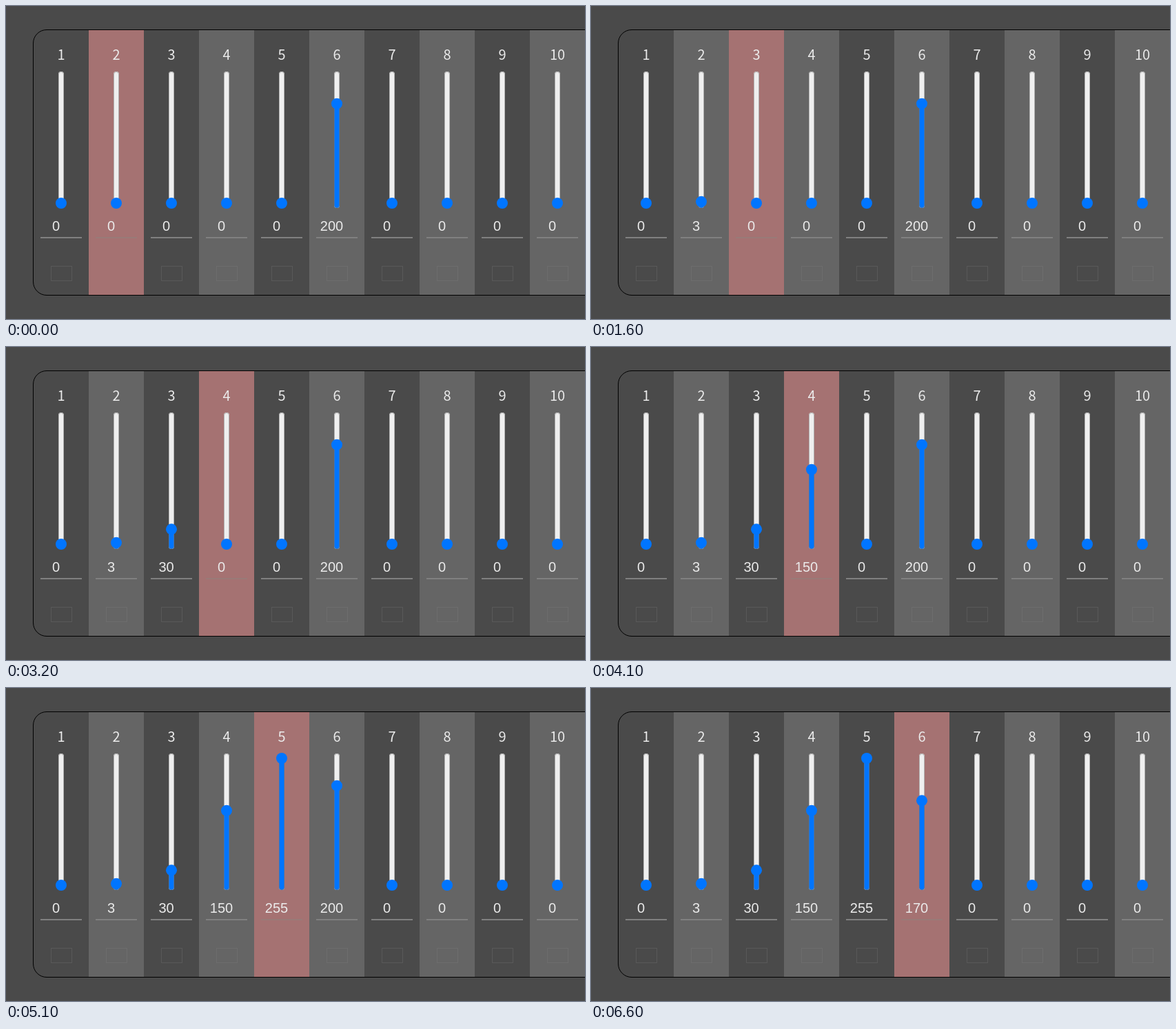
An HTML page that plays this animation: 840x454 px, repeating every 7 s.

```html
<!DOCTYPE html>
<html lang="en">
<head>
<meta charset="utf-8">
<title>Channel faders</title>
<style>
html, body { margin: 0; width: 100%; height: 100%; overflow: hidden; background: #4a4a4a; }
svg { display: block; width: 840px; height: 454px; }
.back { fill: #4a4a4a; }
g:nth-child(even) > .back { fill: #656565; }
.label, .value { fill: #ebebeb; text-anchor: middle; }
.label { font: 20px "Noto Sans CJK JP", "Noto Sans CJK SC", "Noto Sans CJK", "Noto Sans", sans-serif; }
.value { font: 20px "Liberation Sans", Arial, sans-serif; }
.track { fill: #efefef; }
.rim { fill: none; stroke: #767676; stroke-opacity: .5; }
.fill, .knob { fill: #0075ff; }
.line { fill: #808080; }
.box { fill: none; stroke: #808080; stroke-opacity: .27; }
.frame { fill: none; stroke: #000; }
g.selected > .back { fill: #a57272; }
g.selected > .line { fill: #997a78; }
g.selected > .box { stroke: none; }
</style>
</head>
<body>
<svg viewBox="0 0 840 454">
  <clipPath id="card"><rect x="40" y="35" width="830" height="384" rx="19"/></clipPath>
  <g id="columns" clip-path="url(#card)"></g>
  <rect class="frame" x="39.5" y="34.5" width="831" height="385" rx="19.5"/>
</svg>
<script>
const LOOP = 7000;
const KEY_GAP = 200;
const TOP = 102, BOTTOM = 286, MAX = 255;
const initial = channel => channel === 6 ? 200 : 0;

// Each channel is selected, then its value is typed digit by digit.
const entries = [
  { channel: 2, select: 0, type: 800, text: "3" },
  { channel: 3, select: 1600, type: 2200, text: "30" },
  { channel: 4, select: 2900, type: 3300, text: "150" },
  { channel: 5, select: 4200, type: 4400, text: "255" },
  { channel: 6, select: 5300, type: 5900, text: "170" }
];

function add(parent, tag, attrs) {
  const node = document.createElementNS("http://www.w3.org/2000/svg", tag);
  for (const name in attrs) node.setAttribute(name, attrs[name]);
  return parent.appendChild(node);
}

function makeChannel(_, i) {
  const x = 40 + 80 * i;
  const group = add(document.getElementById("columns"), "g", { transform: `translate(${x} 0)` });
  const rect = (name, x, y, width, height, rx = 0) =>
    add(group, "rect", { class: name, x, y, width, height, rx });

  rect("back", 0, 35, 80, 384);
  add(group, "text", { class: "label", x: 40, y: 78 }).textContent = i + 1;
  rect("track", 36, 95, 8, 198, 4);
  const fill = rect("fill", 36, 95, 8, 198, 4);
  rect("rim", 36.5, 95.5, 7, 197, 3.5);
  const knob = add(group, "circle", { class: "knob", cx: 40, r: 8 });
  const value = add(group, "text", { class: "value", x: 32.5, y: 326 });
  rect("line", 10, 335, 60, 2);
  rect("box", 25.5, 377.5, 30, 21);
  return { number: i + 1, group, fill, knob, value };
}

const channels = Array.from({ length: 10 }, makeChannel);

function valueAt(channel, time) {
  const entry = entries.find(e => e.channel === channel);
  if (!entry || time < entry.type) return initial(channel);
  const digits = 1 + Math.floor((time - entry.type) / KEY_GAP);
  return Number(entry.text.slice(0, digits));
}

function draw(time) {
  const active = entries.filter(e => e.select <= time).pop().channel;
  for (const { number, group, fill, knob, value } of channels) {
    const level = valueAt(number, time);
    const y = BOTTOM + (TOP - BOTTOM) * level / MAX;
    group.classList.toggle("selected", number === active);
    fill.setAttribute("y", y);
    fill.setAttribute("height", 293 - y);
    knob.setAttribute("cy", y);
    value.textContent = level;
  }
}

const begin = performance.now();
function tick() {
  draw((performance.now() - begin) % LOOP);
  requestAnimationFrame(tick);
}
tick();
</script>
</body>
</html>
```
